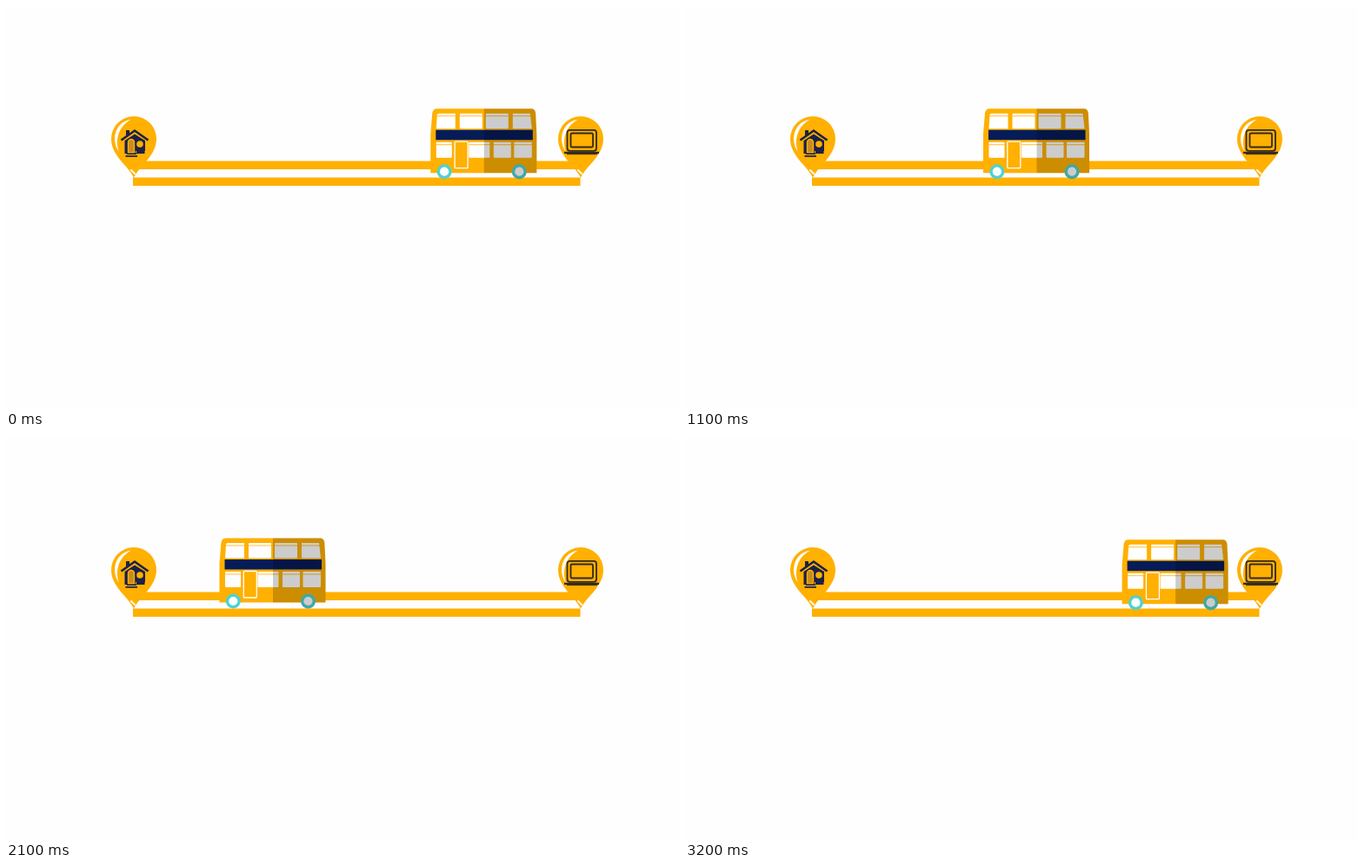
An HTML page that plays this animation: 774x464 px, repeating every 3.3 s.

```html
<!DOCTYPE html>
<html lang="en">
<head>
<meta charset="utf-8">
<title>Bus ride home</title>
<style>
  html, body { margin: 0; width: 100%; height: 100%; overflow: hidden; background: #fefefe; }
  svg { display: block; width: 774px; height: 464px; }
</style>
</head>
<body>
<svg viewBox="0 0 774 464">
  <defs>
    <g id="pin">
      <path d="M0 45C-5 32-26 20-26 0A26 26 0 0 1 26 0C26 20 5 32 0 45Z" fill="#ffb000"/>
      <path d="M-3-22.5C-14-21-22-12-22 0C-22 6-20 11-17 15C-21 4-20-13-3-22.5Z" fill="#fff"/>
      <path d="M-3 36L1 40" stroke="#fff" stroke-width="2" stroke-linecap="round"/>
    </g>
  </defs>

  <path d="M147 183.3H660M146 202.3H660.5" stroke="#ffb000" stroke-width="9.4"/>

  <use href="#pin" x="147" y="153"/>
  <g fill="#1c2148">
    <path d="M138 143h4v5l-4 3z"/>
    <path d="M132.500 154.500L148 143.500L163.500 154.500" fill="none" stroke="#1c2148" stroke-width="2.600"/>
    <path d="M136.500 155L148 147.500L160 155V170H136.500Z"/>
    <path d="M140.500 169V157a3.500 3.500 0 0 1 7 0V169Z" fill="#c78d20" stroke="#ffb000" stroke-width="1.400"/>
    <circle cx="154" cy="159" r="3.800" fill="#ffb000"/>
    <path d="M149 167h12v4h-12z" fill="#ffb000"/>
    <path d="M150 166h9.500v4H150zM139 169.500h11v1.500h-11zM137.500 172h13.500v1.700h-13.500z"/>
  </g>

  <use href="#pin" x="661" y="153"/>
  <g fill="none" stroke="#33291f" stroke-width="1.800">
    <rect x="645.500" y="142.800" width="33.500" height="24" rx="3"/>
    <rect x="649.500" y="146.500" width="25.500" height="16" rx="1.500"/>
    <path d="M642 168.800H682" stroke-width="2.200"/>
    <path d="M645 170.600H680" stroke-width="1"/>
  </g>

  <g id="bus">
    <path d="M7 0H116Q120 0 120.800 5L122 29V74H0V29L2 5Q3 0 7 0Z" fill="#ffb000"/>
    <g fill="#fff">
      <path d="M9 5.500H28.500V23H6.500L7.500 7Z"/>
      <rect x="33.500" y="5.500" width="26" height="17.500" rx="1"/>
      <rect x="63.500" y="5.500" width="26" height="17.500" rx="1"/>
      <path d="M94.500 5.500H114.500L116.500 23H94.500Z"/>
      <rect x="6.500" y="38.500" width="18" height="18" rx="1"/>
      <rect x="44" y="38.500" width="24" height="18" rx="1"/>
      <rect x="72.500" y="38.500" width="20" height="18" rx="1"/>
      <rect x="96" y="38.500" width="20.500" height="18" rx="1"/>
    </g>
    <path d="M7 8.500H116M6 41.500H26M44 41.500H117" stroke="#ffb000" stroke-width=".8"/>
    <rect x="6" y="24.500" width="111.500" height="11.500" fill="#061c58"/>
    <rect x="27.800" y="38" width="15" height="30.500" rx="1" fill="#ffb000" stroke="#fff" stroke-width="1.300"/>
    <g fill="#fff" stroke="#4fd2d0" stroke-width="3.400">
      <circle cx="15.800" cy="72.500" r="6.800"/>
      <circle cx="102" cy="72.500" r="6.800"/>
    </g>
    <path d="M61.500 0H116Q120 0 120.800 5L122 29V74H110.400A8.500 8.500 0 0 1 93.600 74H61.500Z" fill-opacity=".2"/>
  </g>
</svg>
<script>
  const bus = document.getElementById("bus");
  const LOOP = 33, TICK = 100;
  // [tick, left edge]; the bus restarts beside the laptop on tick 31
  const route = [[0, 488.3], [4, 428.3], [11, 343], [17, 274.8], [21, 245.5],
                 [26, 197.2], [30, 158], [31, 517], [33, 488.3]];

  function leftAt(n) {
    const i = route.findIndex(([tick]) => tick > n);
    const [n0, x0] = route[i - 1], [n1, x1] = route[i];
    return x0 + (x1 - x0) * (n - n0) / (n1 - n0);
  }

  function topAt(n) {
    const phase = n > 30 ? 0 : n % 13;
    return phase > 2 && phase < 10 ? 116.5 : 118.2;
  }

  function draw(now) {
    const n = Math.floor(now / TICK) % LOOP;
    bus.setAttribute("transform", `translate(${leftAt(n)} ${topAt(n)})`);
    requestAnimationFrame(draw);
  }

  const start = performance.now();
  draw(0);
  function frame() {
    draw.time = performance.now() - start;
  }
</script>
</body>
</html>
```
